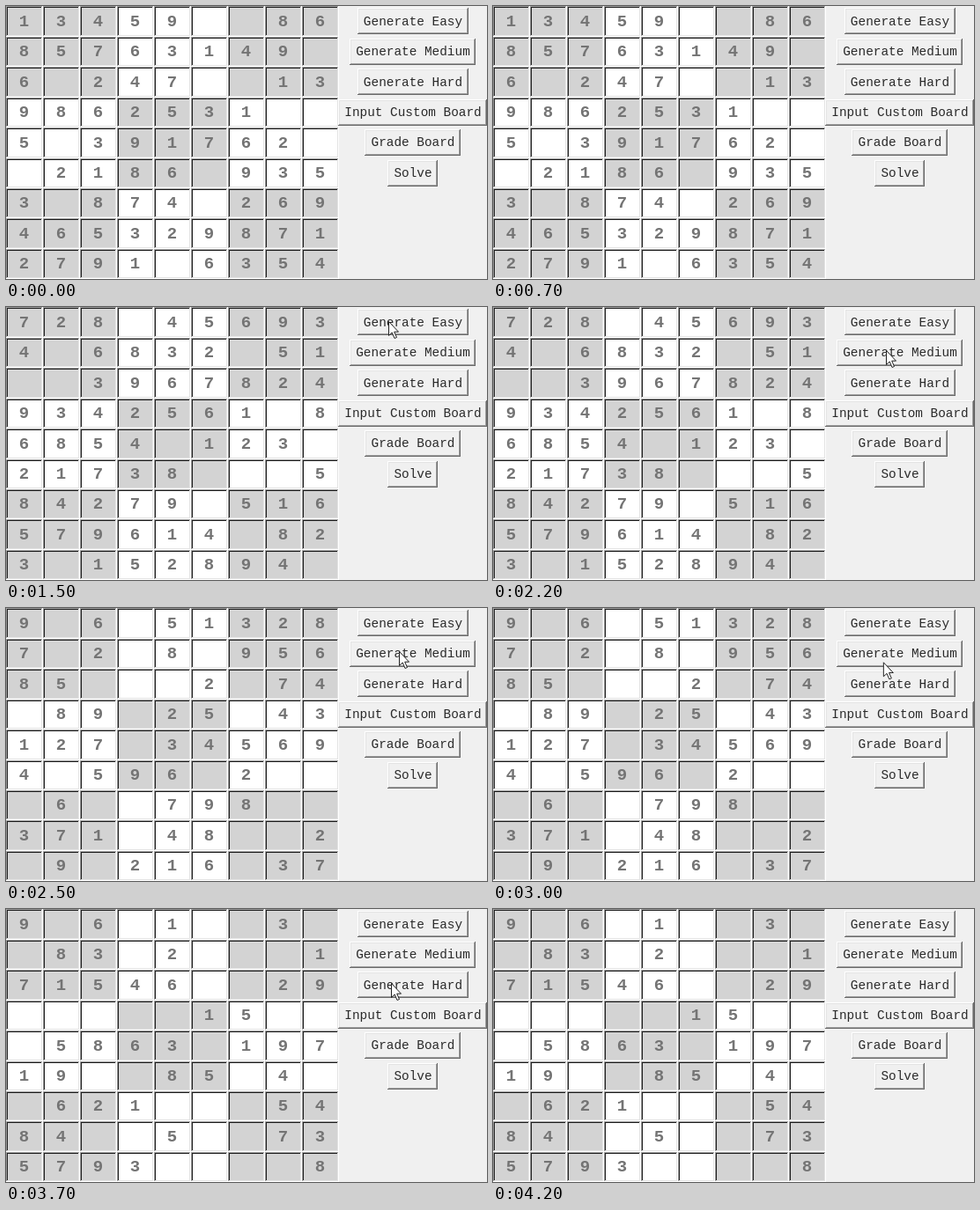
Recreate the animation shown at these times as an HTML page with a canvas. Size 546 by 310 pixels, loop 4800 ms.

```html
<!DOCTYPE html>
<html lang="en">
<head>
<meta charset="utf-8">
<title>Sudoku boards</title>
<style>
  html, body { margin: 0; width: 100%; height: 100%; overflow: hidden; background: #f0f0f0; }
  canvas { display: block; }
</style>
</head>
<body>
<canvas id="stage" width="546" height="310"></canvas>
<script>
const ctx = document.getElementById('stage').getContext('2d');
const LOOP = 4800, STEP = 100;
const CELL_W = 42, CELL_H = 34.45;
const FONT = '"Liberation Mono", "Courier New", monospace';

// Each board takes over at its start time; dots are empty cells.
const boards = [
  { start: 0, rows: '13459..86 85763149. 6.247..13 9862531.. 5.391762. .2186.935 3.874.269 465329871 2791.6354' },
  { start: 1400, rows: '728.45693 4.6832.51 ..3967824 9342561.8 6854.123. 21738...5 84279.516 579614.82 3.152894.' },
  { start: 2400, rows: '9.6.51328 7.2.8.956 85...2.74 .89.25.43 127.34569 4.596.2.. .6..798.. 371.48..2 .9.216.37' },
  { start: 3600, rows: '9.6.1..3. .83.2...1 71546..29 .....15.. .5863.197 19..85.4. .621...54 84..5..73 5793....8' }
].map(({ start, rows }) => ({ start, rows: rows.split(' ') }));

const buttons = [
  { label: 'Generate Easy', width: 126, press: 1300 },
  { label: 'Generate Medium', width: 143, press: 2300 },
  { label: 'Generate Hard', width: 126, press: 3500 },
  { label: 'Input Custom Board', width: 169 },
  { label: 'Grade Board', width: 109 },
  { label: 'Solve', width: 57 }
];

const cursorPath = [
  { t: 1400, x: 434, y: 16 },
  { t: 1700, x: 434, y: 16 },
  { t: 2100, x: 446, y: 49 },
  { t: 2800, x: 446, y: 49 },
  { t: 3300, x: 437, y: 84 },
  { t: 4200, x: 437, y: 84 }
];

const rowTop = r => Math.round(r * CELL_H + 0.3);

function rect(x, y, w, h, color) {
  ctx.fillStyle = color;
  ctx.fillRect(x, y, w, h);
}

// Two-pixel bevel; each colour pair is [outer, inner].
function bevel(x, y, w, h, topLeft, bottomRight, fill) {
  rect(x, y, w, h, bottomRight[0]);
  rect(x, y, w - 1, h - 1, topLeft[0]);
  rect(x + 1, y + 1, w - 2, h - 2, bottomRight[1]);
  rect(x + 1, y + 1, w - 3, h - 3, topLeft[1]);
  rect(x + 2, y + 2, w - 4, h - 4, fill);
}

function drawBoard(rows) {
  ctx.font = `bold 19px ${FONT}`;
  rows.forEach((row, r) => {
    const y = rowTop(r);
    const h = rowTop(r + 1) - y;
    [...row].forEach((digit, c) => {
      const x = c * CELL_W;
      const shaded = (Math.floor(r / 3) + Math.floor(c / 3)) % 2 === 0;
      bevel(x, y, CELL_W, h, ['#a0a0a0', '#1c1c1c'], ['#ffffff', '#e3e3e3'],
        shaded ? '#d3d3d3' : '#ffffff');
      if (digit === '.') return;
      ctx.fillStyle = '#747474';
      ctx.fillText(digit, x + 20.5, Math.round(r * CELL_H + 22.7));
    });
  });
}

function drawButtons(t) {
  ctx.font = `14.4px ${FONT}`;
  buttons.forEach(({ label, width, press }, i) => {
    const y = rowTop(i) + 2;
    const x = Math.round(461.5 - width / 2);
    const down = t >= press && t < press + STEP;
    const light = ['#ffffff', '#e3e3e3'], dark = ['#696969', '#a0a0a0'];
    bevel(x, y, width, 30, down ? dark : light, down ? light : dark, '#f0f0f0');
    ctx.fillStyle = '#2a2a2a';
    ctx.fillText(label, 462 + down, Math.round(i * CELL_H + 21.6) + down);
  });
}

function drawCursor(t) {
  const next = cursorPath.findIndex(p => p.t > t);
  if (next < 1) return;
  const a = cursorPath[next - 1], b = cursorPath[next];
  const k = (t - a.t) / (b.t - a.t);
  const ease = k * k * (3 - 2 * k);
  ctx.save();
  ctx.translate(a.x + (b.x - a.x) * ease + 0.5, a.y + (b.y - a.y) * ease + 0.5);
  const arrow = new Path2D('M0 0V16L3.7 12.5L6.5 19L9 18L6.2 11.7H11Z');
  ctx.fillStyle = '#ffffff';
  ctx.strokeStyle = '#222222';
  ctx.fill(arrow);
  ctx.stroke(arrow);
  ctx.restore();
}

function draw(now) {
  const t = Math.floor((now % LOOP) / STEP) * STEP;
  rect(0, 0, 546, 310, '#f0f0f0');
  ctx.textAlign = 'center';
  drawBoard(boards.filter(b => b.start <= t).pop().rows);
  drawButtons(t);
  drawCursor(t);
}

const begin = performance.now();
function tick() {
  draw(performance.now() - begin);
  requestAnimationFrame(tick);
}
tick();
</script>
</body>
</html>
```
